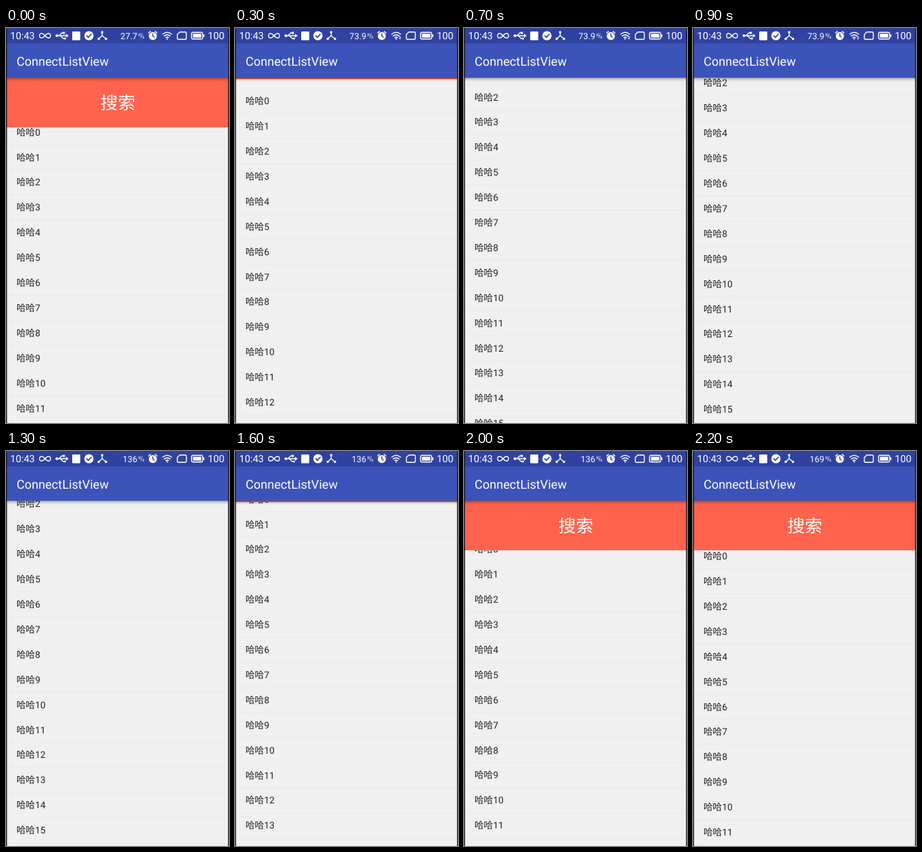
Animation of 320 by 565 pixels, one loop 2300 ms. Source, as an HTML page:

```html
<!DOCTYPE html>
<html lang="zh-CN">
<head>
<meta charset="utf-8">
<title>ConnectListView</title>
<style>
html, body { margin: 0; width: 100%; height: 100%; overflow: hidden; background: #f0f0f0; }
svg { display: block; width: 320px; height: 565px; }
text { font-family: Roboto, "Noto Sans CJK SC", "Noto Sans CJK", sans-serif; text-rendering: geometricPrecision; }
#list text { font-size: 13.35px; fill: #222; }
#list path { stroke: #e9e9e9; }
#status { fill: #fff; font-size: 14.2px; }
.line { fill: none; stroke: #fff; stroke-width: 1.4; stroke-linecap: round; stroke-linejoin: round; }
.cut { stroke: #3042a0; }
</style>
</head>
<body>
<svg viewBox="0 0 320 565">
  <defs>
    <linearGradient id="shade" x2="0" y2="1">
      <stop stop-opacity=".4"/>
      <stop offset=".4" stop-opacity=".14"/>
      <stop offset="1" stop-opacity="0"/>
    </linearGradient>
  </defs>
  <rect width="320" height="565" fill="#f0f0f0"/>
  <g id="list"></g>

  <g id="search">
    <rect y="71" width="320" height="71" fill="#ff634d"/>
    <text x="160.5" y="116.2" text-anchor="middle" font-size="25" font-weight="300" fill="#fff">搜索</text>
  </g>

  <rect y="71" width="320" height="6" fill="url(#shade)"/>
  <rect width="320" height="71" fill="#3c53b9"/>
  <rect width="320" height="22" fill="#3042a0"/>
  <text x="15.2" y="53.5" font-size="17.67" fill="#fff">ConnectListView</text>

  <g id="status">
    <text x="6" y="16.4">10:43</text>
    <text x="289.5" y="16.4">100</text>
    <text id="speed" x="188.3" y="15.5" font-size="12.3" text-anchor="end"></text>
    <text x="190" y="11.5" font-size="6.5">K</text>
    <text x="195.3" y="14.5" font-size="6.5">s</text>
    <path class="line" style="stroke-width:.7" d="M193.6 14L195.4 8"/>
    <!-- infinity -->
    <path class="line" d="M56 11C53 7.2 48.2 6 48.2 11S53 14.8 56 11S63.8 6 63.8 11S59 14.8 56 11"/>
    <!-- usb -->
    <path class="line" d="M73 11H87M76 11L80 7H82M78 11L82 15H84"/>
    <path d="M86 8.2L90 11L86 13.8ZM81.5 5.5h3v3h-3z"/>
    <circle cx="73" cy="11" r="2"/><circle cx="84.5" cy="15" r="1.6"/>
    <rect x="95" y="5" width="11.5" height="12.5" rx="1"/>
    <!-- check -->
    <circle cx="119" cy="11" r="6.6"/>
    <path class="line cut" style="stroke-width:1.7" d="M116 11.2L118.2 13.4L122.2 9"/>
    <!-- three arms -->
    <path class="line" d="M138 6V11L133 15.5M138 11L143.5 15.5"/>
    <circle cx="138" cy="6" r="1.7"/><circle cx="133" cy="15.5" r="1.7"/><circle cx="143.5" cy="15.5" r="1.7"/>
    <!-- alarm -->
    <circle cx="210.7" cy="11.5" r="5.8"/>
    <path class="line" d="M204.8 7L207.3 4.9M216.6 7L214.1 4.9"/>
    <path class="line cut" d="M210.7 8.2V11.7L213 13"/>
    <!-- wifi -->
    <path class="line" d="M225 8.8Q231.3 3.6 237.6 8.8M227.1 11.4Q231.3 8 235.5 11.4M229.3 13.7Q231.3 12.3 233.3 13.7"/>
    <circle cx="231.3" cy="15.6" r="1.1"/>
    <path id="traffic" d="M235.2 13.5h3.2l-1.6-2zM235.2 14.6h3.2l-1.6 2z"/>
    <!-- sim -->
    <path class="line" d="M249.5 5.7H257Q258.7 5.7 258.7 7.2V14.8Q258.7 16.3 257 16.3H247.4Q245.8 16.3 245.8 14.8V9.2Z"/>
    <!-- battery -->
    <rect class="line" x="266.3" y="6.2" width="15.8" height="9.6" rx="2"/>
    <rect x="268.3" y="8.2" width="11.8" height="5.6"/>
    <rect x="282.8" y="9" width="1.8" height="4"/>
  </g>
  <path d="M.7 0V565M319.4 0V565" stroke="#1c1c22" stroke-width="1.4"/>
</svg>
<script>
const LOOP = 2300, STEP = 100, PITCH = 35.9, HEADER = 71;
const $ = id => document.getElementById(id);

// time, centre of the first row, speed per step
const scroll = [
  [0, 149, -4], [500, 61.3, -20], [900, 7, -6], [1100, 3, 0], [1200, 3, 0],
  [1300, 4, 3], [1600, 69, 24], [1800, 114, 19], [2200, 150.5, 2]
];
// start time, text, wifi traffic arrows
const speeds = [[0, '27.7', 0], [100, '73.9', 1], [1100, '136', 0], [2100, '169', 0]];

$('list').innerHTML = Array.from({ length: 18 }, (_, i) => {
  const y = i * PITCH;
  return `<text x="15" y="${y + 4.6}">哈哈${i}</text><path d="M2 ${y + 18}H319"/>`;
}).join('');

function rowY(t) {
  const i = Math.max(1, scroll.findIndex(k => k[0] >= t));
  const [t0, y0, v0] = scroll[i - 1], [t1, y1, v1] = scroll[i];
  const n = (t1 - t0) / STEP, u = (t - t0) / (t1 - t0), w = 1 - u;
  return w * w * ((1 + 2 * u) * y0 + u * n * v0) + u * u * ((1 + 2 * w) * y1 - w * n * v1);
}

function ease(t, from, to) {
  const u = Math.min(1, Math.max(0, (t - from) / (to - from)));
  return (1 - Math.cos(Math.PI * u)) / 2;
}

function draw(now) {
  const t = Math.floor(now % LOOP / STEP) * STEP;
  const shown = 1 - ease(t, 100, 325) + ease(t, 1575, 1800);
  const [, speed, busy] = speeds.findLast(s => s[0] <= t);
  $('list').setAttribute('transform', `translate(0 ${rowY(t)})`);
  $('search').setAttribute('transform', `translate(0 ${HEADER * (shown - 1)})`);
  $('speed').textContent = speed;
  $('traffic').style.opacity = busy;
}

const start = performance.now();
function tick() {
  draw(performance.now() - start);
  requestAnimationFrame(tick);
}
tick();
</script>
</body>
</html>
```
